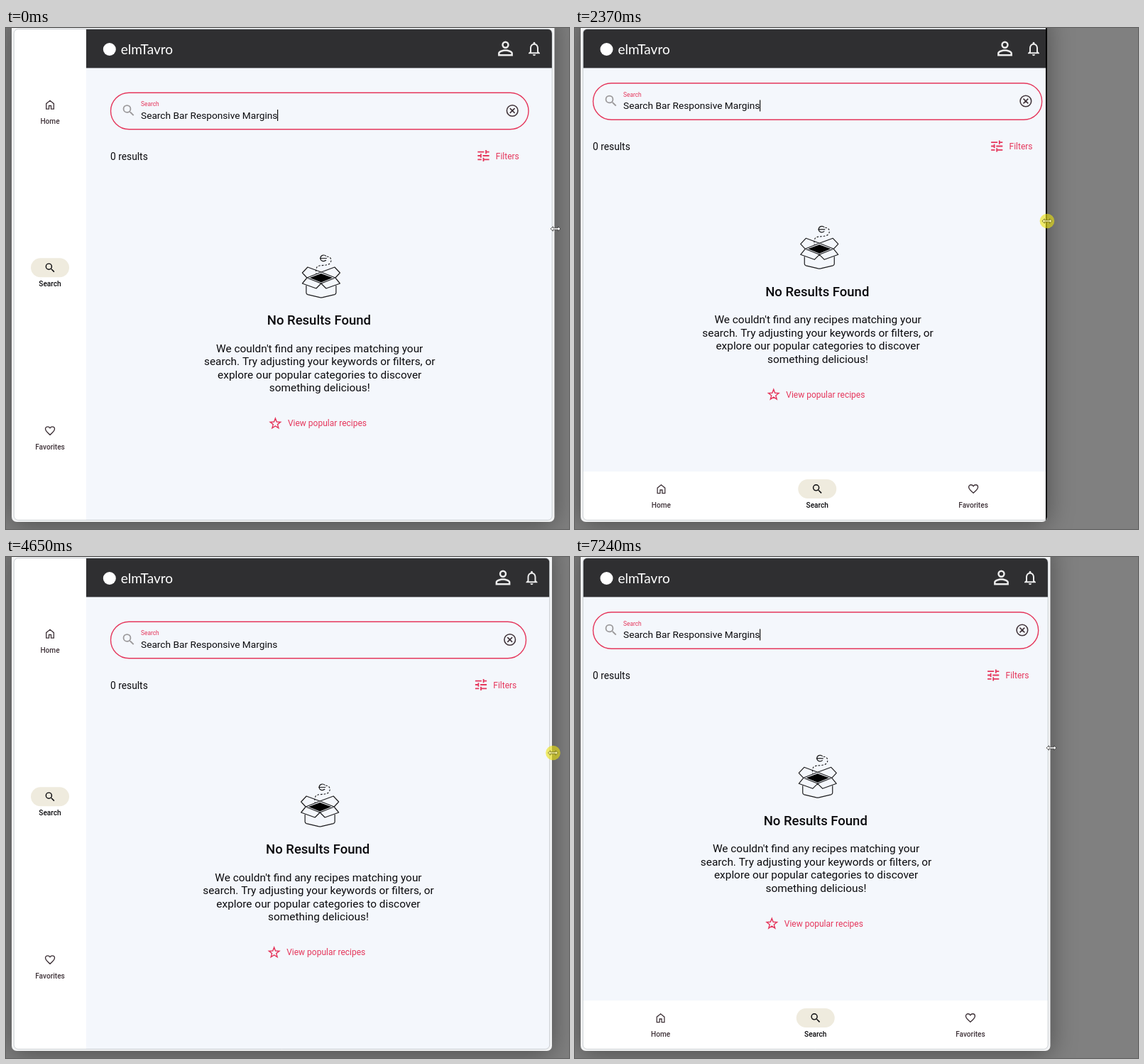
These frames come from a looping animation (793x706 px, 7750 ms). An HTML page with a canvas:

```html
<!DOCTYPE html>
<html lang="en">
<head>
<meta charset="utf-8">
<title>Responsive search page</title>
<style>
html, body { margin: 0; width: 100%; height: 100%; overflow: hidden; background: #808080; }
canvas { display: block; width: 793px; height: 706px; }
</style>
</head>
<body>
<canvas id="stage" width="793" height="706"></canvas>
<script>
const ctx = document.getElementById('stage').getContext('2d');
const LOOP = 7750, BREAKPOINT = 680;
const RED = '#e5375c', INK = '#0b0b0e', BROWN = '#40343a', PAGE = '#f4f7fc', HEADER = '#2f2f31';

// Pointer path as [time, value] pairs
const POINTER_X = [
  [0, 774], [920, 774], [1060, 773], [1200, 769], [1260, 763], [1320, 758],
  [1600, 724], [1660, 717], [2250, 676], [2310, 666.5], [2370, 665], [2420, 662],
  [3140, 662], [3300, 675], [3660, 727], [3780, 739], [3950, 753], [4200, 766],
  [4530, 770.5], [5100, 770.5], [5300, 760], [5840, 695], [5970, 692.5],
  [6030, 688], [6090, 680], [6200, 675], [6520, 675], [6720, 671]
];
const POINTER_Y = [
  [0, 283], [1320, 283], [2370, 272], [3140, 272], [3780, 275],
  [4530, 276], [5100, 276], [6090, 270], [6720, 269]
];

const ICONS = {
  person: 'M12 5.9a2.1 2.1 0 1 1 0 4.2 2.1 2.1 0 0 1 0-4.2m0 9c2.97 0 6.1 1.46 6.1 2.1v1.1H5.9V17c0-.64 3.13-2.1 6.1-2.1M12 4a4 4 0 1 0 0 8 4 4 0 0 0 0-8zm0 9c-2.67 0-8 1.34-8 4v3h16v-3c0-2.66-5.33-4-8-4z',
  bell: 'M12 22c1.1 0 2-.9 2-2h-4c0 1.1.9 2 2 2zm6-6v-5c0-3.07-1.63-5.64-4.5-6.32V4a1.5 1.5 0 0 0-3 0v.68C7.64 5.36 6 7.92 6 11v5l-2 2v1h16v-1l-2-2zm-2 1H8v-6c0-2.48 1.51-4.5 4-4.5s4 2.02 4 4.5v6z',
  search: 'M15.5 14h-.79l-.28-.27A6.47 6.47 0 0 0 16 9.5 6.5 6.5 0 1 0 9.5 16c1.61 0 3.09-.59 4.23-1.57l.27.28v.79l5 4.99L20.49 19l-4.99-5zm-6 0a4.5 4.5 0 1 1 0-9 4.5 4.5 0 0 1 0 9z',
  tune: 'M3 17v2h6v-2H3zM3 5v2h10V5H3zm10 16v-2h8v-2h-8v-2h-2v6h2zM7 9v2H3v2h4v2h2V9H7zm14 4v-2H11v2h10zm-6-4h2V7h4V5h-4V3h-2v6z',
  home: 'M5 10.2V20h5v-6h4v6h5V10.2L12 4.5z',
  heart: 'M12 20C5 14 3 11.5 3 8.5 3 6 5 4 7.5 4 9.2 4 11 5 12 6.6 13 5 14.8 4 16.5 4 19 4 21 6 21 8.5 21 11.5 19 14 12 20z'
};
for (const name in ICONS) ICONS[name] = new Path2D(ICONS[name]);

const BOX_FLAPS = new Path2D('M0 344L-19 337L-26.5 345L-20 352L0 344L19 337L26.5 345L20 352ZM-20 352L-26.5 360L-7 367L0 360L7 367L26.5 360L20 352L0 360Z');
const BOX_BODY = new Path2D('M-21 363V373Q-21 375-19 375.6L-2 379.6Q0 380 2 379.6L19 375.6Q21 375 21 373V363');
const BOX_HOLE = new Path2D('M-16 352L0 346L16 352L0 358.5Z');
const BOX_TRAIL = new Path2D('M8 322C14 322 16 328 12 332C7 336-3 333-6 337Q-8 341-7 346');
const BOX_FLY = new Path2D('M7 321.5C4 318.5-1 320.5-1 324.5S4 330 7 327M-2 324.5H8');

function at(keys, t) {
  if (t <= keys[0][0]) return keys[0][1];
  for (let i = 1; i < keys.length; i++) {
    const [t1, v1] = keys[i], [t0, v0] = keys[i - 1];
    if (t < t1) return v0 + (v1 - v0) * (t - t0) / (t1 - t0);
  }
  return keys[keys.length - 1][1];
}

function rect(x, y, w, h, color) {
  ctx.fillStyle = color;
  ctx.fillRect(x, y, w, h);
}

function roundPath(x, y, w, h, r) {
  ctx.beginPath();
  ctx.roundRect(x, y, w, h, r);
}

function disc(x, y, r, color) {
  ctx.fillStyle = color;
  ctx.beginPath();
  ctx.arc(x, y, r, 0, Math.PI * 2);
  ctx.fill();
}

function text(str, x, y, size, color, { weight = 400, align = 'left', family = 'Roboto' } = {}) {
  ctx.font = `${weight} ${size}px ${family}, sans-serif`;
  ctx.textAlign = align;
  ctx.fillStyle = color;
  ctx.fillText(str, x, y);
}

// Icons sit on a 24 unit grid around (cx, cy)
function icon(name, x, y, scale, color, line = 0, cx = 12, cy = 12) {
  ctx.save();
  ctx.translate(x, y);
  ctx.scale(scale, scale);
  ctx.translate(-cx, -cy);
  if (line) {
    ctx.strokeStyle = color;
    ctx.lineWidth = line / scale;
    ctx.stroke(ICONS[name]);
  } else {
    ctx.fillStyle = color;
    ctx.fill(ICONS[name], 'evenodd');
  }
  ctx.restore();
}

function star(x, y) {
  ctx.beginPath();
  for (let i = 0; i < 10; i++) {
    const r = i % 2 ? 3.2 : 7.6, a = i * Math.PI / 5 - Math.PI / 2;
    ctx.lineTo(x + r * Math.cos(a), y + 0.6 + r * Math.sin(a));
  }
  ctx.closePath();
  ctx.strokeStyle = RED;
  ctx.lineWidth = 1.4;
  ctx.stroke();
}

function emptyBox(x, dy) {
  ctx.save();
  ctx.translate(x, dy);
  ctx.strokeStyle = '#1c1c1e';
  ctx.lineWidth = 1.2;
  ctx.lineJoin = 'round';
  ctx.stroke(BOX_BODY);
  ctx.fillStyle = PAGE;
  ctx.fill(BOX_FLAPS);
  ctx.stroke(BOX_FLAPS);
  ctx.fillStyle = '#000';
  ctx.fill(BOX_HOLE);
  ctx.stroke(BOX_FLY);
  ctx.setLineDash([2.6, 2]);
  ctx.lineWidth = 1.1;
  ctx.stroke(BOX_TRAIL);
  ctx.restore();
}

function navItem(label, x, y) {
  if (label === 'Search') {
    roundPath(x - 27, y - 13.5, 54, 27, 13.5);
    ctx.fillStyle = '#efebde';
    ctx.fill();
    icon('search', x, y, 0.73, INK, 0, 11.75, 11.75);
  } else if (label === 'Home') {
    icon('home', x, y, 0.76, BROWN, 1.3);
  } else {
    icon('heart', x, y, 0.72, BROWN, 1.4);
  }
  text(label, x, y + 26.5, 10.1, label === 'Search' ? INK : BROWN, { weight: 500, align: 'center' });
}

function header(left, right) {
  rect(left, 1.6, right - left, 54.8, HEADER);
  disc(left + 33, 30, 9, '#fff');
  text('elmTavro', left + 49, 36.5, 19, '#fff', { family: 'Lato' });
  icon('person', right - 65.5, 29, 1.3, '#ececec');
  icon('bell', right - 25, 29.5, 1, '#ececec', 0, 12, 12.2);
}

function searchBar(x, y, right, caret) {
  roundPath(x + 0.5, y + 0.3, right - x - 0.5, 51.4, 25.7);
  ctx.strokeStyle = RED;
  ctx.lineWidth = 1.4;
  ctx.stroke();
  icon('search', x + 25.5, y + 25, 0.9, '#9c9a9c', 0, 11.75, 11.75);
  text('Search', x + 43, y + 19, 8.4, RED);
  text('Search Bar Responsive Margins', x + 43, y + 36.5, 13.7, INK);
  if (caret) rect(x + 235, y + 24, 1.2, 16, '#111');

  const cx = right - 22.8, cy = y + 25.5;
  ctx.strokeStyle = BROWN;
  ctx.lineWidth = 1.6;
  ctx.beginPath();
  ctx.arc(cx, cy, 7.8, 0, Math.PI * 2);
  for (const s of [-1, 1]) {
    ctx.moveTo(cx - 3.4, cy - 3.4 * s);
    ctx.lineTo(cx + 3.4, cy + 3.4 * s);
  }
  ctx.stroke();

  text('0 results', x, y + 94.5, 13.8, INK);
  icon('tune', right - 63.5, y + 89, 0.9, RED);
  text('Filters', right - 46.2, y + 93.8, 12, RED);
}

function emptyState(x, dy) {
  emptyBox(x + 3, dy);
  text('No Results Found', x, 418.3 + dy, 18.5, INK, { weight: 500, align: 'center' });
  [
    "We couldn't find any recipes matching your",
    'search. Try adjusting your keywords or filters, or',
    'explore our popular categories to discover',
    'something delicious!'
  ].forEach((line, i) => text(line, x + 0.8, 457 + dy + i * 18.4, 15.4, INK, { align: 'center' }));
  star(x - 61.5, 557 + dy);
  text('View popular recipes', x - 44, 561.4 + dy, 12, RED);
}

function page(right, caret) {
  const wide = right > BREAKPOINT;
  const left = wide ? 112.8 : 11.5;
  const mid = (left + right) / 2;

  ctx.save();
  roundPath(11.5, 1.5, right - 11.5, 692, 6);
  ctx.fillStyle = PAGE;
  ctx.fill();
  ctx.clip();
  header(left, right);
  searchBar(left + (wide ? 34.2 : 13.5), wide ? 91 : 77.5, right - (wide ? 33 : 13.3), caret);
  emptyState(mid, wide ? 0 : -40.7);

  const items = ['Home', 'Search', 'Favorites'];
  if (wide) {
    rect(11, 1, left - 11, 693, '#fff');
    items.forEach((label, i) => navItem(label, 62, 108 + i * 229.8));
  } else {
    rect(11, 625, right - 11, 69, '#fff');
    const step = (right - 11.5) / 3;
    items.forEach((label, i) => navItem(label, 11.5 + step * (i + 0.5), 649.5));
  }
  ctx.restore();

  roundPath(11.2, 1.5, right - 11, 692, 6);
  ctx.strokeStyle = 'rgba(160,165,172,.55)';
  ctx.lineWidth = 0.9;
  ctx.stroke();
}

function pointer(x, y, pressed) {
  if (pressed) disc(x, y, 10.3, 'rgba(236,226,16,.62)');
  ctx.beginPath();
  for (const s of [-1, 1]) {
    ctx.lineTo(x + 3.6 * s, y - 1.2 * s);
    ctx.lineTo(x + 3.6 * s, y - 3.2 * s);
    ctx.lineTo(x + 7 * s, y);
    ctx.lineTo(x + 3.6 * s, y + 3.2 * s);
    ctx.lineTo(x + 3.6 * s, y + 1.2 * s);
  }
  ctx.closePath();
  ctx.fillStyle = pressed ? '#f5f0a0' : '#fff';
  ctx.fill();
  ctx.strokeStyle = pressed ? '#6a6714' : '#333';
  ctx.lineWidth = 0.8;
  ctx.stroke();
}

function draw(t) {
  const x = at(POINTER_X, t), y = at(POINTER_Y, t);
  // The window trails the pointer and the page trails the window
  const edge = at(POINTER_X, t - 60) - 1.5;
  const right = Math.round(at(POINTER_X, t - 120) * 2) / 2 - 5;
  const caret = Math.floor((t - 390) / 526) % 2 !== 0;

  rect(0, 0, 793, 706, '#808080');
  ctx.save();
  roundPath(8, -20, edge - 8, 716, 7);
  ctx.shadowColor = 'rgba(0,0,0,.4)';
  ctx.shadowBlur = 36;
  ctx.shadowOffsetY = 4;
  ctx.fillStyle = '#f3f4f5';
  ctx.fill();
  ctx.shadowColor = 'transparent';
  ctx.clip();
  page(right, caret);
  if (right + 3 > edge + 0.5) {
    const start = Math.min(x + 2, edge - 2);
    rect(start, 0, edge - start, 696, '#050505');
  } else if (edge - right > 6) {
    rect(edge - 4, 2, 4, 54, HEADER);
  }
  ctx.restore();

  pointer(x, y, t >= 650 && t < 7140);
}

const began = performance.now();
function tick() {
  draw((performance.now() - began) % LOOP);
  requestAnimationFrame(tick);
}
tick();
</script>
</body>
</html>
```
